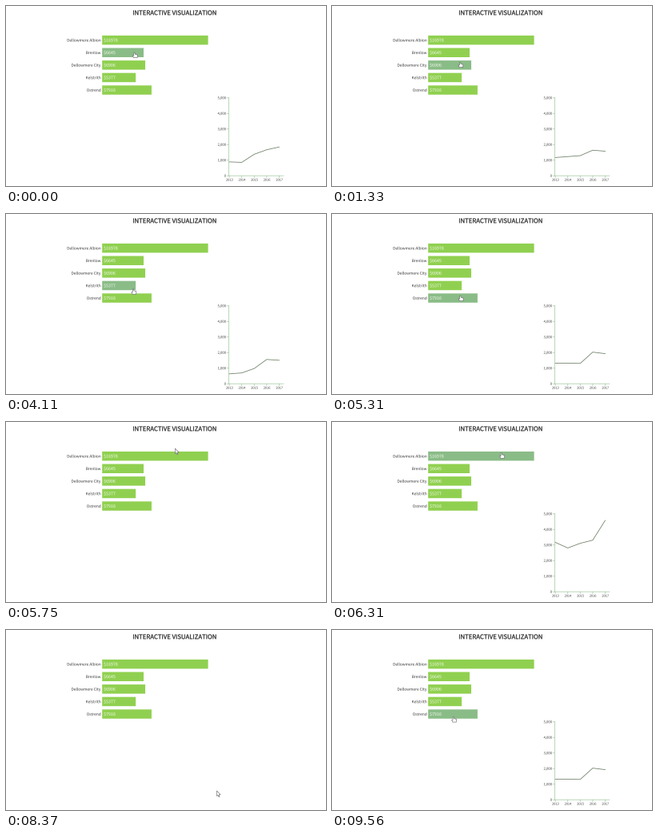
Recreate the animation shown at these times as a matplotlib script. Size 400 by 225 pixels, loop 9700 ms.

```python
import matplotlib.pyplot as plt
import numpy as np
from matplotlib.animation import FuncAnimation
from matplotlib.patches import PathPatch, Polygon, Rectangle
from matplotlib.textpath import TextPath
from matplotlib.transforms import Affine2D

W, H, DPI = 400, 225, 100
LOOP, STEP = 9700, 25
PT = 72 / DPI  # points per pixel
FONT = {"family": "Noto Sans CJK JP"}

GREEN, HOVER = "#90d050", "#8abc87"
AXIS, LINE, INK = "#a9cfa9", "#6d7f66", "#383838"

# yearly figures; each bar shows their sum
TEAMS = {
    "Dellowmere Albion": [3170, 2810, 3110, 3310, 4578],
    "Brenlow": [890, 860, 1380, 1670, 1845],
    "Dellowmere City": [1170, 1230, 1290, 1640, 1576],
    "Kelstrith": [635, 695, 980, 1560, 1507],
    "Ostrend": [1325, 1325, 1305, 2030, 1931],
}
FIRST_YEAR, YEARS = 2013, 5

BAR_X, BAR_Y, BAR_H, BAR_GAP = 120.2, 36.9, 11.5, 15.6
BAR_SCALE = 132.4 / 16978
PLOT_L, PLOT_R, PLOT_T, PLOT_B = 278.6, 347, 114.8, 212.2

# pointer moves: start ms, end ms, goal, optional bend point
START = (160.5, 58)
MOVES = [
    (1090, 1420, (160, 73)),
    (2140, 2900, (157.5, 86.3), (215, 92)),
    (3950, 4310, (160.4, 102), (160, 97)),
    (5310, 5800, (213, 31)),
    (5800, 6270, (211.8, 36)),
    (6270, 6310, (211.8, 39)),
    (7800, 8350, (263.5, 201)),
    (8350, 8530, (165, 170)),
    (8800, 9200, (122, 120)),
    (9350, 9560, (152, 108.3)),
]
HAND = np.array([(-.7, .2), (.5, .2), (.8, 2.2), (3.8, 3.2), (3.6, 6.7),
                 (-1, 6.7), (-2.2, 4), (-.7, 4)])
ARROW = np.array([(0, 0), (0, 6.6), (1.5, 5.3), (2.5, 7.7), (3.6, 7.2),
                  (2.6, 5), (4.6, 4.8)])


def pointer_at(ms):
    """Eased position; a bend point turns a move into a curve."""
    pos = np.array(START)
    for begin, end, goal, *bend in MOVES:
        if ms <= begin:
            break
        u = min((ms - begin) / (end - begin), 1)
        s = u * u * (3 - 2 * u)
        goal = np.array(goal)
        mid = np.array(bend[0]) if bend else (pos + goal) / 2
        pos = (1 - s) ** 2 * pos + 2 * s * (1 - s) * mid + s * s * goal
    return pos


def plot_x(k):
    return PLOT_L + .5 + 15.6 * k


def plot_y(value):
    return PLOT_B - (PLOT_B - PLOT_T) * np.asarray(value) / 5000


fig = plt.figure(figsize=(W / DPI, H / DPI), dpi=DPI, facecolor="white")
ax = fig.add_axes([0, 0, 1, 1])
ax.set(xlim=(0, W), ylim=(H, 0))
ax.axis("off")


def text(x, y, s, px, color, align=.5, weight=0):
    """Text on baseline y; align runs from 0 (left) to 1 (right)."""
    path = TextPath((0, 0), s, size=px, prop=FONT)
    box = path.get_extents()
    place = Affine2D().translate(-box.x0 - align * box.width, 0)
    path = place.scale(1, -1).translate(x, y).transform_path(path)
    return ax.add_patch(PathPatch(path, fc=color, ec=color, lw=weight * PT))


def stroke(xs, ys, color, px):
    return ax.plot(xs, ys, color=color, lw=px * PT, snap=False)[0]


text(210.8, 11.2, "INTERACTIVE VISUALIZATION", 7.75, "#1c1c1c", weight=.2)

bars = []
for k, (team, values) in enumerate(TEAMS.items()):
    top = BAR_Y + k * BAR_GAP
    bar = Rectangle((BAR_X, top), sum(values) * BAR_SCALE, BAR_H, lw=0,
                    snap=False)
    bars.append(ax.add_patch(bar))
    text(118.3, top + 7.6, team, 4.8, INK, align=1)
    text(122.4, top + 7.7, f"${sum(values)}", 5.3, "#f6fbf2", align=0)

chart = [
    stroke([PLOT_L] * 2, [PLOT_T, PLOT_B], AXIS, .8),
    stroke([PLOT_L, PLOT_R], [PLOT_B] * 2, AXIS, .8),
]
for value in range(0, 5001, 1000):
    y = plot_y(value)
    chart.append(stroke([PLOT_L - 2.3, PLOT_L], [y, y], AXIS, .8))
    chart.append(text(274.8, y + 1.5, f"{value:,}", 4.2, INK, align=1))
for k in range(YEARS):
    x = plot_x(k)
    chart.append(stroke([x, x], [PLOT_B, PLOT_B + 2.2], AXIS, .8))
    chart.append(text(x + .2, 218.6, str(FIRST_YEAR + k), 3.9, INK))
curve = stroke([], [], LINE, .8)
chart.append(curve)

pointer = ax.add_patch(Polygon(ARROW, closed=True, fc="white", ec="#62626a",
                               lw=.6 * PT, zorder=5))


def hovered(x, y):
    for k, bar in enumerate(bars):
        top = bar.get_y()
        if BAR_X <= x <= BAR_X + bar.get_width() and top <= y <= top + BAR_H:
            return k
    return None


def draw(n):
    pos = pointer_at(n * STEP)
    hit = hovered(*pos)
    for k, bar in enumerate(bars):
        bar.set_facecolor(HOVER if k == hit else GREEN)
    for part in chart:
        part.set_visible(hit is not None)
    if hit is not None:
        values = list(TEAMS.values())[hit]
        curve.set_data(plot_x(np.arange(YEARS)), plot_y(values))
    pointer.set_xy((ARROW if hit is None else HAND) + pos)
    return [*bars, *chart, pointer]


anim = FuncAnimation(fig, draw, frames=LOOP // STEP, interval=STEP,
                     repeat=True, repeat_delay=0, blit=False)
plt.show()
```
